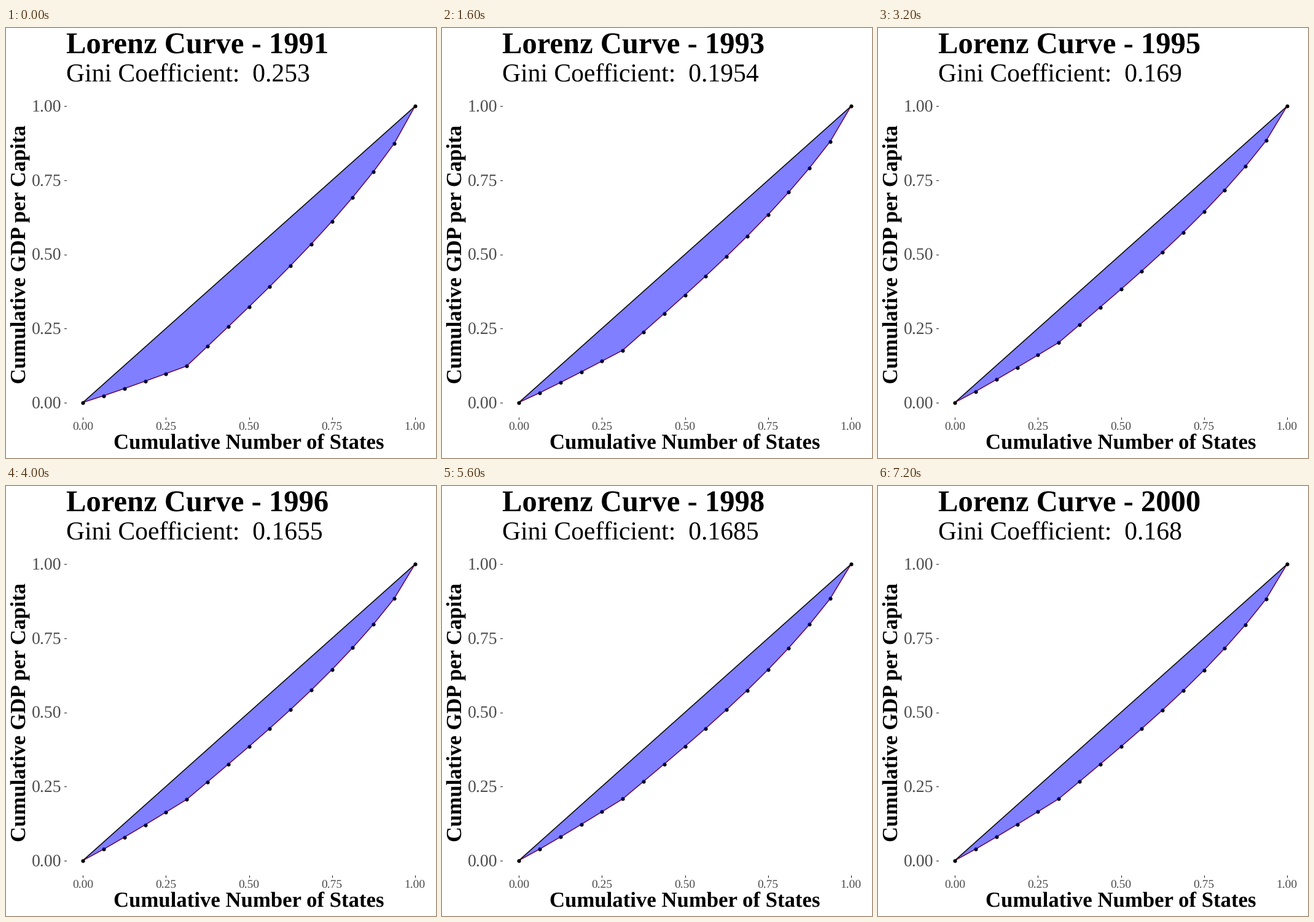
Recreate the animation shown at these times as a matplotlib script. Size 700 px wide and 700 px high, loop 8000 ms.

```python
import numpy as np
import matplotlib.pyplot as plt
from matplotlib.animation import FuncAnimation

SIZE, DPI = 700, 100
FRAME_MS = 800
FIRST_YEAR = 1991
GINI = [0.253, 0.2255, 0.1954, 0.1782, 0.169, 0.1655, 0.167, 0.1685, 0.1682, 0.168]
STATES, POOR = 16, 5

plt.rcParams["font.family"] = "Liberation Serif"
plt.rcParams["text.hinting"] = "none"


def px(x):
    return 125.2 + 540.6 * x


def py(y):
    return 609.6 - 482.2 * y


def lorenz(t):
    """Cumulative shares t years after the start: poor states, then the rest."""
    poor_share = 0.208 - 0.085 * np.exp(-0.36 * t ** 1.45)
    poor = poor_share * np.linspace(0, 1, POOR + 1) ** 1.05
    u = np.linspace(0, 1, STATES - POOR + 1)[1:]
    slope = 0.83 - 0.0022 * t
    rest = slope * u + (0.97 - slope) * u ** 3.5 + 0.03 * u ** 30
    return np.concatenate([poor, poor_share + (1 - poor_share) * rest])


fig = plt.figure(figsize=(SIZE / DPI, SIZE / DPI), dpi=DPI, facecolor="white")
ax = fig.add_axes([0, 0, 1, 1])
ax.set_xlim(0, SIZE)
ax.set_ylim(SIZE, 0)
ax.axis("off")


def label(x, y, text, size, **kw):
    return ax.text(x, y, text, fontsize=size, va="baseline", **kw)


def tick(xs, ys):
    ax.plot(xs, ys, color="#333333", lw=0.8)


title = label(98, 41, "", 35, weight="bold")
subtitle = label(98, 87, "", 30)
label(395.5, 686, "Cumulative Number of States", 25, weight="bold", ha="center")
label(32, 368.5, "Cumulative GDP per Capita", 25, weight="bold", ha="center",
      rotation=90, rotation_mode="anchor")

for v in np.linspace(0, 1, 5):
    label(px(v), 654, f"{v:.2f}", 14, ha="center", color="#4d4d4d")
    label(90.5, py(v) + 9.6, f"{v:.2f}", 20, ha="right", color="#4d4d4d")
    tick([px(v)] * 2, [633.7, 637])
    tick([94.5, 98], [py(v)] * 2)

# The translucent area lies over the curve and its dots.
xs = px(np.linspace(0, 1, STATES + 1))
curve, = ax.plot([], [], color="#8b0000", lw=1.07)
dots, = ax.plot([], [], "o", color="black", ms=4.5, mew=0)
area, = ax.fill([0, 1, 1], [0, 0, 1], color="blue", alpha=0.5, lw=0, zorder=3)
ax.plot(px(np.array([0, 1])), py(np.array([0, 1])), color="black", lw=1.07, zorder=4)


def draw(i):
    ys = py(lorenz(i))
    title.set_text(f"Lorenz Curve - {FIRST_YEAR + i}")
    subtitle.set_text(f"Gini Coefficient:  {GINI[i]}")
    curve.set_data(xs, ys)
    dots.set_data(xs, ys)
    area.set_xy(np.column_stack([xs, ys]))
    return title, subtitle, area, curve, dots


anim = FuncAnimation(fig, draw, frames=len(GINI), interval=FRAME_MS,
                     repeat=True, repeat_delay=0)
plt.show()
```
